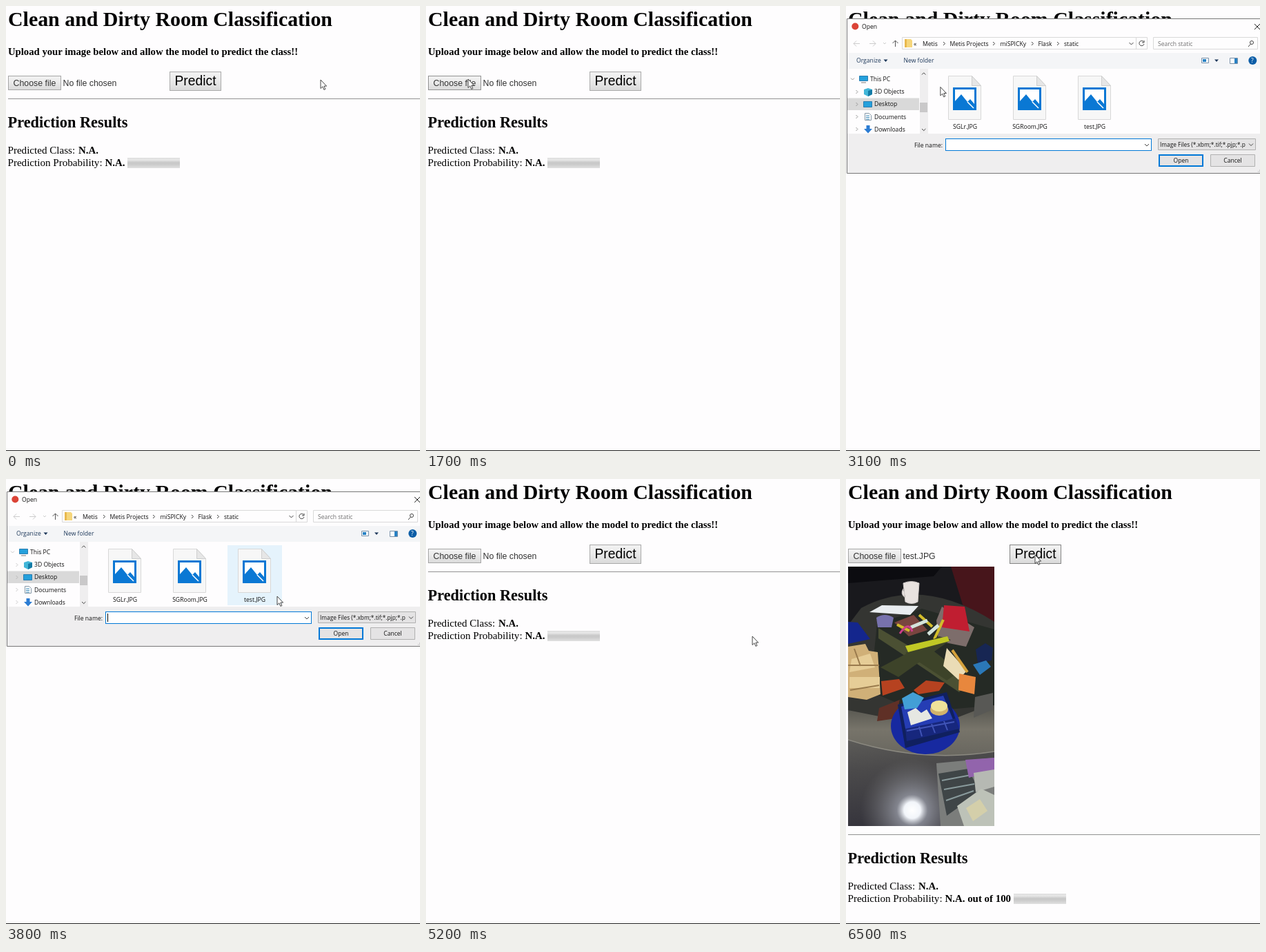
An HTML page for the animation above (8 s loop, 600 by 645 pixels).

```html
<!DOCTYPE html>
<html lang="en">
<head>
<meta charset="utf-8">
<title>Room classification demo</title>
<style>
html, body { margin: 0; width: 100%; height: 100%; overflow: hidden; background: #fefdfe; }
svg { display: block; }
text { font-variant-ligatures: none; white-space: pre; }
.serif { font-family: "Liberation Serif", "Times New Roman", serif; fill: #000; }
.bold { font-weight: bold; }
.sans { font-family: "Liberation Sans", Arial, sans-serif; fill: #333; }
.ui { font: 8.6px "Open Sans", "Noto Sans", sans-serif; fill: #111; }
.line { fill: none; stroke: #444; stroke-width: 1; }
</style>
</head>
<body>
<svg width="600" height="645" viewBox="0 0 600 645">
  <defs>
    <linearGradient id="button" x2="0" y2="1">
      <stop stop-color="#f2f2f2"/><stop offset=".4" stop-color="#ececec"/><stop offset="1" stop-color="#dadada"/>
    </linearGradient>
    <linearGradient id="pressed" x2="0" y2="1">
      <stop stop-color="#dcdcdc"/><stop offset="1" stop-color="#ececec"/>
    </linearGradient>
    <linearGradient id="meter" x2="0" y2="1">
      <stop stop-color="#ddd"/><stop offset=".2" stop-color="#e8e8e8"/><stop offset=".45" stop-color="#c9c9c9"/>
      <stop offset=".6" stop-color="#c9c9c9"/><stop offset="1" stop-color="#e0e0e0"/>
    </linearGradient>
    <linearGradient id="rug" x2="0" y2="1">
      <stop stop-color="#4a4a45"/><stop offset=".5" stop-color="#77746a"/><stop offset="1" stop-color="#66645d"/>
    </linearGradient>
    <linearGradient id="glass" x2=".2" y2="1">
      <stop stop-color="#5c5b58"/><stop offset=".35" stop-color="#4b4a4b"/><stop offset="1" stop-color="#35343c"/>
    </linearGradient>
    <radialGradient id="glow">
      <stop stop-color="#fff"/><stop offset=".16" stop-color="#f2f5fa"/>
      <stop offset=".3" stop-color="#9a9da8" stop-opacity=".75"/><stop offset="1" stop-color="#777" stop-opacity="0"/>
    </radialGradient>
    <clipPath id="photoClip"><path d="M3 127h212v376H3z"/></clipPath>
    <clipPath id="typeClip"><path d="M453 192h126v18H453z"/></clipPath>
    <clipPath id="paneClip"><path d="M2 91h598v94H2z"/></clipPath>
    <g id="file">
      <path d="M-23.5 101.5h34l13 14v49h-47z" fill="#f7f7f7" stroke="#d8d8d8"/>
      <path d="M10.500 101.500v14h13z" fill="#e6e6e6" stroke="#cfcfcf"/>
      <path d="M-17 118h34v33h-34z" fill="#0a78d4"/>
      <path d="M-14 121h28v21l-6-7-4 4-9-11-9 10z" fill="#fff"/>
      <path d="M4 139l9 9" stroke="#fff" stroke-width="1.500"/>
    </g>
  </defs>

  <rect width="600" height="645" fill="#fefdfe"/>
  <text class="serif bold" x="3" y="29" font-size="29.9">Clean and Dirty Room Classification</text>
  <text class="serif bold" x="3" y="71" font-size="14.7">Upload your image below and allow the model to predict the class!!</text>
  <rect id="choose" x="3.5" y="101.5" width="76" height="20" fill="url(#button)" stroke="#a6a6a6"/>
  <text class="sans" x="10.5" y="115.5" font-size="12.35">Choose file</text>
  <text class="sans" id="chosen" x="82.5" y="115.5" font-size="12.3"></text>
  <rect id="predict" x="237.5" y="95.5" width="74" height="27" fill="url(#button)"/>
  <text class="sans" x="244.5" y="115.3" font-size="19.3" style="fill:#000">Predict</text>

  <g id="photo" clip-path="url(#photoClip)">
    <rect x="3" y="127" width="212" height="376" fill="#2c2c2b"/>
    <path d="M3 127h212v80L150 178 60 182 3 215z" fill="#19191d"/>
    <path d="M152 127h63v85l-45-27z" fill="#47151b"/>
    <path d="M3 127h136l-12 14-124 10z" fill="#0c0c10"/>
    <path d="M3 318h212v90H3z" fill="url(#rug)"/>
    <path d="M22 187Q110 140 215 207v118l-52 20-100 2-60-12V212z" fill="#343532"/>
    <path d="M45 210l65-22 105 30v110l-110 10-70-30z" fill="#252a25"/>
    <path d="M83 151q12-5 23 0l-2 27q-9 5-18 0zM83 159q-5 8 3 13" fill="#e8e2df" stroke="#cfc9c7"/>
    <path d="M34 193l18-10 53 1-12 13z" fill="#e9edf0"/>
    <path d="M131 205l8-20 47 30-12 28-40-8z" fill="#7d6d6b"/>
    <path d="M142 183l30 2 7 36-40-6z" fill="#c01e31"/>
    <path d="M44 201q12-8 25 0l-3 14H46z" fill="#7772ad"/>
    <path d="M70 208l28-11 20 22-27 9z" fill="#79453f"/>
    <path d="M74 211l18 9M106 197l19 17M128 232l13-28" stroke="#d2bd2a" stroke-width="4"/>
    <path d="M94 215l24-10M119 225l15-13" stroke="#d4e4dc" stroke-width="5"/>
    <path d="M78 224q13-19 18-3" fill="none" stroke="#cb3d89" stroke-width="3"/>
    <path d="M3 207l14 1 18 24-32 7z" fill="#14268d"/>
    <path d="M3 243l25-4 5 10 13 2 4 61-20 8-27-4z" fill="#d0b078"/>
    <path d="M8 261l27-8 7 20-37 7zM5 287h44v16H5z" fill="#e6cd97"/>
    <path d="M3 270h45M6 306l42-7M12 246l9 25" stroke="#9a7b4d" stroke-width="2"/>
    <path d="M47 216l34 20 97 57-14 16-70-47-47-31z" fill="#4b5033"/>
    <path d="M50 273l85-45 17 5-76 54zM86 252l29-12 50 39-19 13z" fill="#3d4329"/>
    <path d="M86 242l61-14 3 7-60 16z" fill="#c0c825"/>
    <path d="M146 245l29 33-12 13-22-20z" fill="#eadcb6"/>
    <path d="M154 248l22 32" stroke="#d5a13c" stroke-width="4"/>
    <path d="M188 247l14-9 11 7-2 18-20 4z" fill="#172653"/>
    <path d="M184 269l19-6 7 9-16 12z" fill="#2b78b8"/>
    <path d="M164 282l24 5-2 25-23-6z" fill="#e8873d"/>
    <path d="M98 306l18-14 27 3-8 12-30 5zM51 293l26-3 8 13-32 11z" fill="#b64220"/>
    <path d="M187 316l26-6v24l-28 12z" fill="#585855"/>
    <path d="M48 332l30-12-6 27-27 4z" fill="#5f3026"/>
    <path d="M3 378q106 34 212 17v108H3z" fill="url(#glass)"/>
    <path d="M3 378q106 34 212 17" fill="none" stroke="#8b8980" stroke-width="1.500"/>
    <ellipse cx="96" cy="480" rx="75" ry="75" fill="url(#glow)"/>
    <ellipse cx="115" cy="358" rx="50" ry="41" fill="#1729a0"/>
    <path d="M75 327l71-18 19 58-79 23z" fill="#10205f"/>
    <path d="M80 330l61-16 17 42-70 16z" fill="#253db4"/>
    <path d="M86 362l73-15 5 15-76 18z" fill="#17277d"/>
    <path d="M88 365l69-13M106 359l4 14M124 355l5 13M142 351l5 13" stroke="#4054b7" stroke-width="2"/>
    <path d="M81 318l16-9 16 8-10 15-18 2z" fill="#439fd6"/>
    <path d="M89 338l12-6 8 7 8-5 8 13-31 10z" fill="#e6e7e2"/>
    <ellipse cx="135" cy="334" rx="13" ry="9" fill="#d0b26c"/>
    <ellipse cx="135" cy="329" rx="12" ry="8" fill="#efe39a"/>
    <path d="M131 412l84-8v99h-78z" fill="#7b7d7b"/>
    <path d="M134 427l43-7 17 34-48 34z" fill="#3f4547"/>
    <path d="M139 437l42-8M142 450l44-8M145 466l40-14" stroke="#899a9c" stroke-width="2"/>
    <path d="M173 407l42-3v19l-37 10z" fill="#9264ac"/>
    <path d="M185 426l30-5v25l-27 8z" fill="#b6b9b3"/>
    <path d="M161 474l35-25 19 9v45h-44z" fill="#bdc2b8"/>
    <path d="M174 477l20-13 11 17-21 15z" fill="#d4cfaa"/>
  </g>

  <g id="results">
    <path d="M3 134.5h597" stroke="#929292"/>
    <text class="serif bold" x="2.5" y="176" font-size="22.35">Prediction Results</text>
    <text class="serif" x="2.5" y="214" font-size="15.1">Predicted Class:</text>
    <text class="serif bold" x="105" y="214" font-size="14.9">N.A.</text>
    <text class="serif" x="2.5" y="232" font-size="15.1">Prediction Probability:</text>
    <text class="serif bold" id="chance" x="143.5" y="232" font-size="14.9"></text>
    <rect id="bar" y="220" width="76" height="15" fill="url(#meter)"/>
  </g>
  <path d="M0 644.5h600" stroke="#222"/>

  <g id="dialog">
    <path d="M1.5 242.5v-224H601v224z" fill="#fefdfe" stroke="#777"/>
    <path d="M2 185h598v57H2z" fill="#efeeef"/>
    <circle cx="13.3" cy="29.5" r="5" fill="#db4437"/>
    <text class="ui" x="23" y="33">Open</text>
    <path class="line" d="M592 26l8 8m0-8l-8 8" style="stroke:#222"/>
    <path d="M107 91h12v94h-12z" fill="#efeeef"/>
    <path d="M107 140h11v14h-11z" fill="#c9c8c9"/>
    <path class="line" d="M110 99.5l2.7-2.7 2.7 2.7M110 178l2.7 2.7 2.7-2.7"/>

    <path id="blank" fill="#fefdfe" d="M100 195h40v11h-40zM144 192h299v18H144zM452 192h142v17H452zM452 214h67v20h-67zM528 214h66v20h-66zM595 230h5v12h-5z"/>

    <g id="content">
      <g class="line">
        <path d="M11 54.5h9M15 50.5l-4 4 4 4M34 54.5h9M39 50.5l4 4-4 4M54 53l2 2 2-2" stroke="#ccc"/>
        <path d="M71.5 50v9M67.5 54l4-4 4 4" stroke="#555"/>
        <path d="M81.5 45.5h355v17h-355zM420.5 46v16M445.5 45.5h151v17h-151z" stroke="#d9d9d9"/>
        <path d="M410.5 53l3 3 3-3"/>
        <path d="M431.5 52a3.6 3.6 0 1 0 .5 3M432 50v3h-3"/>
        <path d="M583 59l3.5-4"/><circle cx="588" cy="53" r="2.5"/>
      </g>
      <path d="M85 48h9l2 2v10H85z" fill="#f6d67c"/><path d="M85 48h3v12h-3z" fill="#e9b94e"/>
      <g id="path"></g>
      <text class="ui" x="452" y="57.5" style="fill:#707070">Search static</text>

      <path d="M2 68h598v23H2z" fill="#f4f5f7"/>
      <text class="ui" x="15" y="82" style="fill:#1e395b">Organize</text>
      <text class="ui" x="83.5" y="82" style="fill:#1e395b">New folder</text>
      <path d="M54.5 77.5h6l-3 3.5zM534 77.5h6l-3 3.5z" fill="#1e395b"/>
      <path d="M515.5 75.5h10v7h-10zM556.5 75.5h11v8h-11z" fill="#fff" stroke="#7890a8"/>
      <path d="M517 77h5v4h-5zM563 76h4v7h-4z" fill="#2781c4"/>
      <circle cx="589.3" cy="79" r="6" fill="#0b5da7"/>
      <text class="ui bold" x="587" y="82.3" style="fill:#fff">?</text>

      <g clip-path="url(#paneClip)">
        <path d="M2 133.5h104v17.500H2z" fill="#d9d9d9"/>
        <path id="twisties" class="line" d="M7 104.5l2.5 2.5 2.5-2.5M14.5 122l2.5 2.5-2.5 2.5M14.5 140l2.5 2.5-2.5 2.5M14.5 158l2.5 2.5-2.5 2.5M14.5 176l2.5 2.5-2.5 2.5" style="stroke:#999"/>
        <path d="M19.5 101.5h12v7h-12zM25.5 138.5h12v8h-12z" fill="#25a0dc" stroke="#2b7db0"/>
        <path d="M22 111h7" stroke="#777"/>
        <path d="M26 121l6-2 6 2v7l-6 3-6-3z" fill="#41b6d8"/><path d="M32 123l6-2v7l-6 3z" fill="#147ba6"/>
        <path d="M27.5 155.5h6l3 3v7h-9z" fill="#fff" stroke="#8497a6"/><path d="M29 159h5m-5 2.5h5m-5 2.5h5" stroke="#3f8dbb"/>
        <path d="M29.5 173h5v5H38l-6 6.5-6-6.5h3.5z" fill="#2b7cd3"/>
        <g id="tree"></g>
        <rect id="tile" x="321.5" y="96.5" width="78" height="86"/>
        <g id="files"></g>
      </g>

      <text class="ui" x="99" y="204.5">File name:</text>
      <rect id="field" x="144.5" y="192.5" width="298" height="17" fill="#fff"/>
      <text class="ui" id="fileName" x="147" y="204.5"></text>
      <path id="caret" d="M147.5 195v12" stroke="#000"/>
      <path class="line" d="M433 200l3 3 3-3"/>
      <path d="M452.5 192.5h141v16h-141zM528.5 215.5h64v17h-64z" fill="#e4e3e4" stroke="#b0b0b0"/>
      <text class="ui" x="455" y="204" clip-path="url(#typeClip)" style="font-size:8.3px">Image Files (*.xbm;*.tif;*.pjp;*.png)</text>
      <path class="line" d="M584 199.5l3 3 3-3"/>
      <rect id="open" x="453.5" y="215.5" width="64" height="17" stroke="#0078d7"/>
      <rect id="openInner" x="454.5" y="216.5" width="62" height="15" fill="none" stroke="#0078d7"/>
      <text class="ui" x="485.5" y="227" text-anchor="middle">Open</text>
      <text class="ui" x="560.5" y="227" text-anchor="middle">Cancel</text>
      <path d="M597 240h1m1 0h1m-1-2h1" stroke="#aaa"/>
    </g>
  </g>

  <g id="cursor" stroke="#333" fill="#fff" stroke-linejoin="round">
    <path id="arrow" d="M0 0v12.5l2.9-2.7 2 4.6 2-.9-2-4.4h3.7z" stroke-width=".9"/>
    <path id="hand" d="M4 10V2q0-1.5 1.3-1.5T6.500 2v5q0-1 1.200-1T9 7.500q0-1 1.200-.8t1.200 1.300q1.600-.6 1.600 1v3q0 2-1.200 3.500V18H5.500v-2L.8 10.700Q0 9.500 1 9t3 2z"/>
  </g>
</svg>
<script>
const LOOP = 8000, STEP = 100;
const $ = id => document.getElementById(id);
const show = (id, on) => { $(id).style.display = on ? "" : "none"; };
const set = (id, attrs) => { for (const k in attrs) $(id).setAttribute(k, attrs[k]); };
const label = (text, x, y, anchor = "start") =>
  `<text class="ui" x="${x}" y="${y}" text-anchor="${anchor}">${text}</text>`;

$("path").innerHTML = label("«", 98, 57.5) +
  [["Metis", 111], ["Metis Projects", 150.5], ["miSPICKy", 223.5], ["Flask", 278.5], ["static", 316]]
    .map(([name, x]) => label(name, x, 57.5)).join("") +
  [141, 213, 269, 306].map(x => `<path class="line" d="M${x} 52l2.5 2.5-2.5 2.5"/>`).join("");
$("tree").innerHTML = ["This PC", "3D Objects", "Desktop", "Documents", "Downloads"]
  .map((name, i) => label(name, i ? 41 : 35, 109 + i * 18.2)).join("");
$("files").innerHTML = ["SGLr.JPG", "SGRoom.JPG", "test.JPG"]
  .map((name, i) => `<use href="#file" x="${172 + i * 94}"/>` + label(name, 172.5 + i * 94, 178, "middle")).join("");

// time, x, y of the pointer tip
const route = [
  [700, 456, 107], [1100, 66, 119], [1200, 66, 119], [1400, 61, 106], [2000, 61, 106], [2200, 57, 106],
  [2900, 57, 106], [3500, 365, 150], [3800, 393, 170], [4200, 393, 170], [4700, 473, 228],
  [5600, 473, 228], [6100, 274, 110]
];

function pointer(t) {
  const i = route.findIndex(p => p[0] > t);
  if (i === 0) return route[0].slice(1);
  if (i < 0) return route[route.length - 1].slice(1);
  const [a, b] = [route[i - 1], route[i]];
  const u = (t - a[0]) / (b[0] - a[0]), e = u * u * (3 - 2 * u);
  return [a[1] + (b[1] - a[1]) * e, a[2] + (b[2] - a[2]) * e];
}

function draw(t) {
  const [x, y] = pointer(t);
  const inside = (l, top, r, bottom) => x >= l && x <= r && y >= top && y <= bottom;
  const dialog = t >= 2200 && t < 5000, loaded = t >= 2700;
  const picked = t >= 4000, uploaded = t >= 5300;

  set("choose", {
    fill: t === 1600 ? "url(#pressed)" : "url(#button)",
    stroke: !dialog && inside(3, 101, 80, 122) ? "#929292" : "#a6a6a6"
  });
  set("predict", {
    fill: t >= 6300 && t < 6500 ? "url(#pressed)" : "url(#button)",
    stroke: inside(237, 95, 312, 123) ? "#858585" : "#a9a9a9"
  });
  $("chosen").textContent = uploaded ? "test.JPG" : "No file chosen";
  $("chance").textContent = uploaded ? "N.A. out of 100" : "N.A.";
  set("bar", { x: uploaded ? 243 : 176 });
  set("results", { transform: `translate(0 ${uploaded ? 381 : 0})` });
  show("photo", uploaded);

  show("dialog", dialog);
  show("blank", !loaded);
  show("content", loaded);
  show("tile", picked || inside(321, 96, 400, 183));
  set("tile", { fill: picked ? "#cce8ff" : "#e5f3fc", stroke: picked ? "#99d1ff" : "#e5f3fc" });
  set("twisties", { opacity: Math.max(0, Math.min(1, (4200 - t) / 800)) });
  set("field", { stroke: picked ? "#8a8a8a" : "#0078d7" });
  $("fileName").textContent = picked ? "test.JPG" : "";
  show("caret", !picked && Math.floor(t / 500) % 2);
  const over = inside(453, 215, 518, 233);
  set("open", { fill: over ? "#e5f1fb" : "#e4e3e4" });
  show("openInner", !over);

  const hand = t >= 2100 && t < 2900;
  show("hand", hand);
  show("arrow", !hand);
  set("cursor", { transform: `translate(${x} ${y})` });
}

function tick() {
  draw(Math.floor(performance.now() % LOOP / STEP) * STEP);
  requestAnimationFrame(tick);
}
tick();
</script>
</body>
</html>
```
